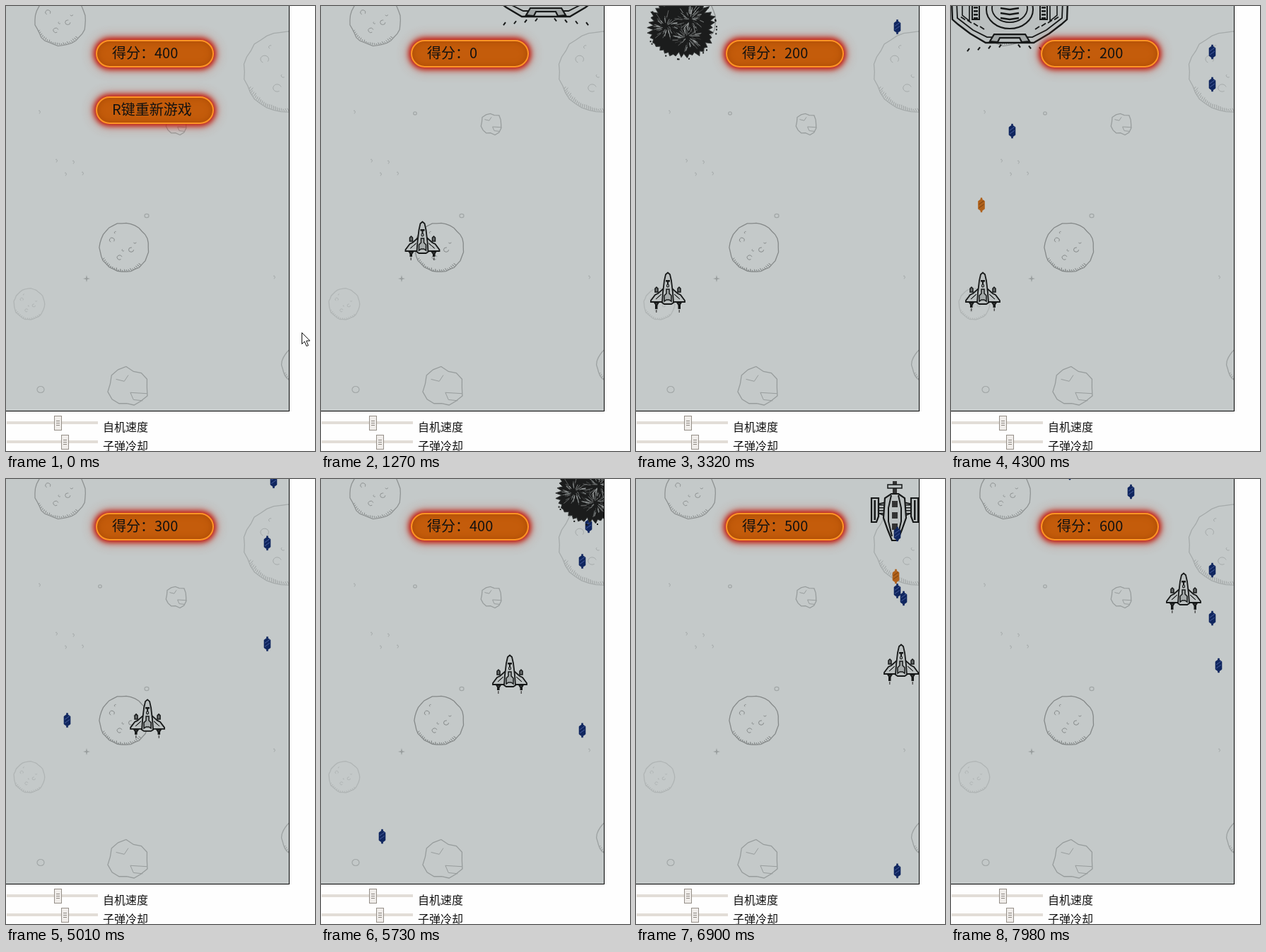
Recreate the animation shown at these times as an HTML page with a canvas. Size 437 px wide and 630 px high, loop 8 s.

```html
<!DOCTYPE html>
<html lang="zh">
<head>
<meta charset="utf-8">
<style>
html, body { margin: 0; width: 100%; height: 100%; overflow: hidden; background: #fefefe; }
body { position: relative; font: 16px/20px "Noto Sans CJK SC", "Noto Sans CJK", sans-serif; color: #111; }
body > * { position: absolute; }
canvas { left: 0; top: 0; border: solid #000; border-width: 0 1px 1px 0; }
.pill { left: 127px; width: 167px; height: 39px; box-sizing: border-box; padding-left: 21px; border: 2px solid #ff9524;
  border-radius: 20px; background: #c45c0b; font-size: 20px; line-height: 32px; white-space: nowrap;
  box-shadow: 0 0 7px 3px #c2180a, 0 0 15px 5px rgba(190, 70, 50, .45), inset 0 0 10px #a94a05; }
.track { left: 1px; width: 129px; height: 4px; background: #e2ddd7; }
.track i { position: absolute; top: -8px; width: 9px; height: 19px; border: 1px solid #958f88;
  background: repeating-linear-gradient(#8b8680 0 1px, transparent 1px 3px) 2px 6px / 5px 8px no-repeat, #f0edea; }
.label { left: 137px; }
#cursor { left: 0; top: 0; }
</style>
</head>
<body>
<canvas id="stage" width="400" height="573"></canvas>
<div class="pill" id="score" style="top:48px"></div>
<div class="pill" id="restart" style="top:128px">R键重新游戏</div>
<div class="track" style="top:588px"><i style="left:67px"></i></div>
<div class="label" style="top:585px">自机速度</div>
<div class="track" style="top:615px"><i style="left:77px"></i></div>
<div class="label" style="top:612px">子弹冷却</div>
<svg id="cursor" width="13" height="21"><path d="M.5 .5V16.5L4.2 13L7 19.5L9.5 18.5L6.8 12H11.8Z" fill="#fff" stroke="#111"/></svg>
<script>
const $ = id => document.getElementById(id);
const ctx = $('stage').getContext('2d');
const LOOP = 8000, START = 640, STEP = 89, BLAST = 310, SHOT_SPEED = 0.9;
const PAPER = '#c4c9c9', METAL = '#bbc0c0', INK = '#161818';

// Turning points: time, x, y
const FLIGHT = [[1000, 200, 440], [1263, 143.5, 332], [1441, 124, 345], [1843, 305, 404], [2545, 24, 404],
  [2800, 45, 404], [4640, 45, 404], [5350, 350, 276], [5713, 267, 276], [6440, 234, 276], [6750, 369, 262],
  [6870, 375, 261], [7938, 329, 160]];
const POINTER = [[190, 418, 462], [460, 301, 454]];

const BOSS = { draw: boss, speed: 0.08, reach: 82, blast: [29, 52] };
const FIGHTER = { draw: fighter, speed: 0.1, reach: 34, blast: [14, -28] };
const enemy = (type, x, born) => ({ ...type, x, born, noseY: t => (t - born) * type.speed });
const enemies = [enemy(BOSS, 318, 1063), enemy(FIGHTER, 50, 2420), enemy(BOSS, 83, 3626),
  enemy(FIGHTER, 366, 5080), enemy(FIGHTER, 255, 5850), enemy(FIGHTER, 366, 6000)];

const shots = [1700, 1838, 2650, 4181, 5330, 6090, 6760].map(born => {
  const [x, y] = along(FLIGHT, born);
  return { x: x - 2, born, gone: Infinity, y: t => y - 25 - (t - born) * SHOT_SPEED };
});

// x, time of entry at the top edge, speed
const BOMBS = [[369.5, 2217, 0.0362], [86.5, 3479, 0.231], [369.5, 3586, 0.172], [378.5, 4859, 0.089],
  [369.5, 5029, 0.0478], [254.5, 7658, 0.1], [168, 7918, 0.05]];

// Each enemy falls to the first free shot that meets its nose
for (const foe of enemies) {
  const meeting = shot => (shot.y(0) + foe.born * foe.speed) / (foe.speed + SHOT_SPEED);
  const shot = shots.find(s => s.gone === Infinity && Math.abs(s.x - foe.x) < foe.reach && meeting(s) > foe.born);
  foe.dies = shot.gone = meeting(shot);
}

function along(path, t) {
  const next = path.findIndex(key => key[0] > t);
  if (next <= 0) return path[next < 0 ? path.length - 1 : 0].slice(1);
  const [t0, x0, y0] = path[next - 1], [t1, x1, y1] = path[next];
  const part = (t - t0) / (t1 - t0);
  return [x0 + (x1 - x0) * part, y0 + (y1 - y0) * part];
}

function randomizer(seed) {
  return () => (seed = (seed * 16807) % 2147483647) / 2147483647;
}

function paint(fill, stroke, width) {
  if (fill) { ctx.fillStyle = fill; ctx.fill(); }
  if (stroke) { ctx.strokeStyle = stroke; ctx.lineWidth = width; ctx.stroke(); }
}

function shape(points, { fill, stroke = INK, width = 1.5, open } = {}) {
  ctx.beginPath();
  points.forEach(([x, y]) => ctx.lineTo(x, y));
  if (!open) ctx.closePath();
  paint(fill, stroke, width);
}

function oval(x, y, rx, ry = rx, { fill, stroke = INK, width = 1.2, from = 0, sweep = 2 * Math.PI } = {}) {
  ctx.beginPath();
  ctx.ellipse(x, y, rx, ry, 0, from, from + sweep);
  paint(fill, stroke, width);
}

function box(x, y, w, h, fill = INK) {
  ctx.fillStyle = fill;
  ctx.fillRect(x, y, w, h);
}

function at(x, y, draw, ...args) {
  ctx.save();
  ctx.translate(x, y);
  draw(...args);
  ctx.restore();
}

const mirror = half => [...half, ...half.slice().reverse().map(([x, y]) => [-x, y])];
const bothSides = draw => [-1, 1].forEach(side => { ctx.save(); ctx.scale(side, 1); draw(); ctx.restore(); });
const polar = (angle, rx, ry = rx) => [rx * Math.cos(angle), ry * Math.sin(angle)];
const ring = (count, point) => Array.from({ length: count }, (_, i) => point(i / count * 2 * Math.PI, i));

function moon(r, stroke) {
  const random = randomizer(r * 7919);
  shape(ring(34, a => polar(a, r * (0.97 + 0.05 * random()))), { stroke, width: 1.3 });
  for (let a = 0.8; a < 2.7; a += 3.2 / r) {
    shape([polar(a, r * 0.97), polar(a + 0.03, r * (0.87 + 0.05 * random()))], { stroke, width: 0.9 });
  }
  for (let i = 0; i < 3; i++) {
    const [x, y] = polar(0.3 + i * 1.7, r * (0.3 + i * 0.14));
    oval(x, y, r * 0.1, r * 0.09, { stroke, width: 1, from: i, sweep: 5 });
    oval(x + r * 0.15, y - r * 0.3, r * 0.05, r * 0.04, { stroke, width: 1, from: i, sweep: 3 });
  }
}

function boulder(r, stroke) {
  const random = randomizer(r * 4391);
  shape(ring(15, (a, i) => polar(a, r * (0.9 + 0.13 * random() - (i % 4 ? 0 : 0.12)))), { stroke, width: 1.3 });
  shape([[r * 0.9, r * 0.3], [r * 0.1, r * 0.25], [r * 0.25, r * 0.6], [r * 0.7, r * 0.65]], { stroke, width: 1, open: true });
  shape([[-r * 0.6, -r * 0.4], [-r * 0.2, -r * 0.3], [0, -r * 0.6]], { stroke, width: 1, open: true });
}

function background() {
  box(0, 0, 400, 573, PAPER);
  at(77, 20, moon, 36, '#8f9393');
  at(394, 93, moon, 57.5, '#a5aaaa');
  at(167, 342, moon, 35, '#858989');
  at(33, 422, moon, 22, '#b0b5b5');
  at(419, 508, moon, 29, '#9ca1a1');
  at(241, 167, boulder, 16, '#989d9d');
  at(173, 540, boulder, 29, '#979c9c');
  const stroke = '#a2a7a7';
  [[199, 297, 3], [133, 152, 2.3], [49, 543, 5]].forEach(([x, y, r]) => oval(x, y, r, r * 0.9, { stroke }));
  [[71, 219], [95, 221], [84, 238], [108, 237], [47, 150], [379, 384]].forEach(([x, y]) =>
    oval(x, y, 1.3, 2, { stroke, width: 1, from: 4, sweep: 4 }));
  at(114, 386, () => shape(ring(8, (a, i) => polar(a, i % 2 ? 1.5 : 5)), { fill: '#999e9e', stroke: '' }));
}

function playerShip(flicker) {
  bothSides(() => {
    box(14.5, 18, 3.5, 5 + flicker * 2);
    box(15.5, 24 + flicker * 2, 1.5, 4, '#555');
    shape([[14, 1], [14, -4], [16, -6], [18, -4], [18, 1]], { fill: '#6a6e6e' });
    shape([[6, -4], [14, 3], [18, 5], [24, 13], [24, 15], [7, 15]], { fill: METAL, width: 1.8 });
    shape([[13, 16], [19, 16], [17, 19], [15, 19]], { fill: '#444' });
    shape([[9, 4], [17, 11]], { width: 1 });
  });
  shape(mirror([[0, -26.5], [3, -24], [5, -15], [7, 2], [8, 16], [5, 18]]), { fill: METAL, width: 1.8 });
  box(-3, -16, 6, 2.5);
  box(-1, -14, 2, 4);
  oval(0, -8, 1.5, 2);
  shape(mirror([[2, -3], [2, 3], [5, 6], [5, 14], [2, 12]]), { fill: '#a5aaaa' });
}

// Enemies have their origin at the lowest point
function boss() {
  shape(mirror([[70, -130], [82, -60], [81, -34], [73, -27], [56, -14], [34, -1]]), { fill: METAL, width: 2.4 });
  shape(mirror([[62, -130], [75, -60], [74, -36], [52, -19], [32, -9]]), { width: 1.8 });
  shape(mirror([[22, -13], [28, -3], [17, -2], [14, -8]]), { fill: '#a0a5a5', width: 2.2 });
  oval(0, -48, 33, 27, { width: 2 });
  oval(0, -50, 25, 20, { width: 1.8 });
  for (let y = -64; y < -34; y += 7) shape([[-13, y], [0, y + 2], [13, y]], { open: true, width: 2.4 });
  bothSides(() => {
    shape([[43, -66], [53, -66], [53, -34], [43, -34]], { width: 2 });
    for (let y = -62; y < -36; y += 5) box(45, y, 6, 2.5);
    shape([[57, -60], [57, -32], [67, -40], [67, -60]], { width: 1.6 });
    for (let x = 36; x < 66; x += 9) shape([[x, -20 - (x - 36) * 0.5], [x + 6, -24 - (x - 36) * 0.5]], { width: 1.8 });
    for (let x = 12; x < 60; x += 15) shape([[x, x / 8], [x + 3, x / 8 + 4]], { width: 2 });
  });
}

function fighter() {
  ctx.translate(0, -42);
  box(-3, -42, 6, 22, '#333');
  shape([[-10, -37], [10, -37], [10, -32], [-10, -32]], { fill: METAL });
  bothSides(() => {
    shape([[12, -12], [26, -9], [26, 2], [12, 8]], { fill: METAL, width: 1.8 });
    shape([[23, -18], [33, -18], [33, 16], [26, 16], [23, 8]], { fill: METAL, width: 2.2 });
    box(27, -15, 2.5, 28);
    for (let y = -9; y < 6; y += 4) box(13, y, 9, 1.5);
  });
  shape(mirror([[5, -24], [14, -18], [16, 10], [10, 27], [4, 42]]), { fill: METAL, width: 2.2 });
  bothSides(() => shape([[5, -22], [9, -4], [9, 15], [4, 36]], { open: true, width: 2 }));
  for (let y = -14; y < 30; y += 16) box(-4, y, 8, 9, '#333');
}

function bullet(fill, streak) {
  shape(mirror([[1, -10], [1, -8], [4.5, -5.5], [4.5, 5.5], [1, 8], [1, 10]]), { fill, stroke: fill, width: 0.6 });
  for (let y = -3; y < 6; y += 5) shape([[-3.5, y + 2], [3.5, y - 3]], { stroke: streak, width: 0.7 });
}

function explosion(age) {
  const random = randomizer(77), grow = Math.min(1, 0.7 + age / 400);
  ctx.scale(grow, grow);
  const rim = ring(72, (a, i) => {
    const d = (i % 2 ? 0.8 : 0.94) + 0.12 * random() + 0.05 * Math.abs(Math.sin(2 * a));
    return polar(a, 47 * d, 42 * d);
  });
  shape(rim, { fill: '#1b1c1c', stroke: '#333636', width: 1 });
  for (let i = 0; i < 150; i++) {
    const hub = polar(i % 3 * 2.1 - 0.9, 21, 15), a = random() * 6.3, near = 2 + 12 * random(), far = near + 3 + 8 * random();
    const [x0, y0] = polar(a, near), [x1, y1] = polar(a + 0.1, far);
    shape([[hub[0] + x0, hub[1] + y0], [hub[0] + x1, hub[1] + y1]],
      { stroke: `rgba(175, 180, 180, ${0.1 + 0.5 * random()})`, width: 0.9 });
  }
  for (let i = 0; i < 20; i++) box(...polar(random() * 6.3, 49, 44), 2, 2);
}

function battle(t) {
  for (const foe of enemies)
    if (t >= foe.born - 60 && t < foe.dies) at(foe.x, foe.noseY(t), foe.draw);
  at(...along(FLIGHT, t), playerShip, Math.round(t / STEP) % 2);
  for (const [x, born, speed] of BOMBS) at(x, (t - born) * speed - 10, bullet, '#10265f', '#44599a');
  for (const shot of shots)
    if (t >= shot.born && t < shot.gone) at(shot.x, shot.y(t), bullet, '#b0611b', '#7a420f');
  for (const { x, dies, blast, noseY } of enemies)
    if (t >= dies && t < dies + BLAST) at(x + blast[0], noseY(dies) + blast[1], explosion, t - dies);
}

function render(now) {
  const clock = now % LOOP, playing = clock >= START;
  const t = START + Math.floor((clock - START + 5) / STEP) * STEP;
  background();
  if (playing) battle(t);
  const points = playing ? enemies.filter(foe => foe.dies <= t).length * 100 : 400;
  $('score').textContent = '得分：' + points;
  $('restart').style.visibility = $('cursor').style.visibility = playing ? 'hidden' : 'visible';
  const [x, y] = along(POINTER, t);
  $('cursor').style.transform = `translate(${x}px, ${y}px)`;
}

const origin = performance.now();
function tick() {
  render(performance.now() - origin);
  requestAnimationFrame(tick);
}
tick();
</script>
</body>
</html>
```
